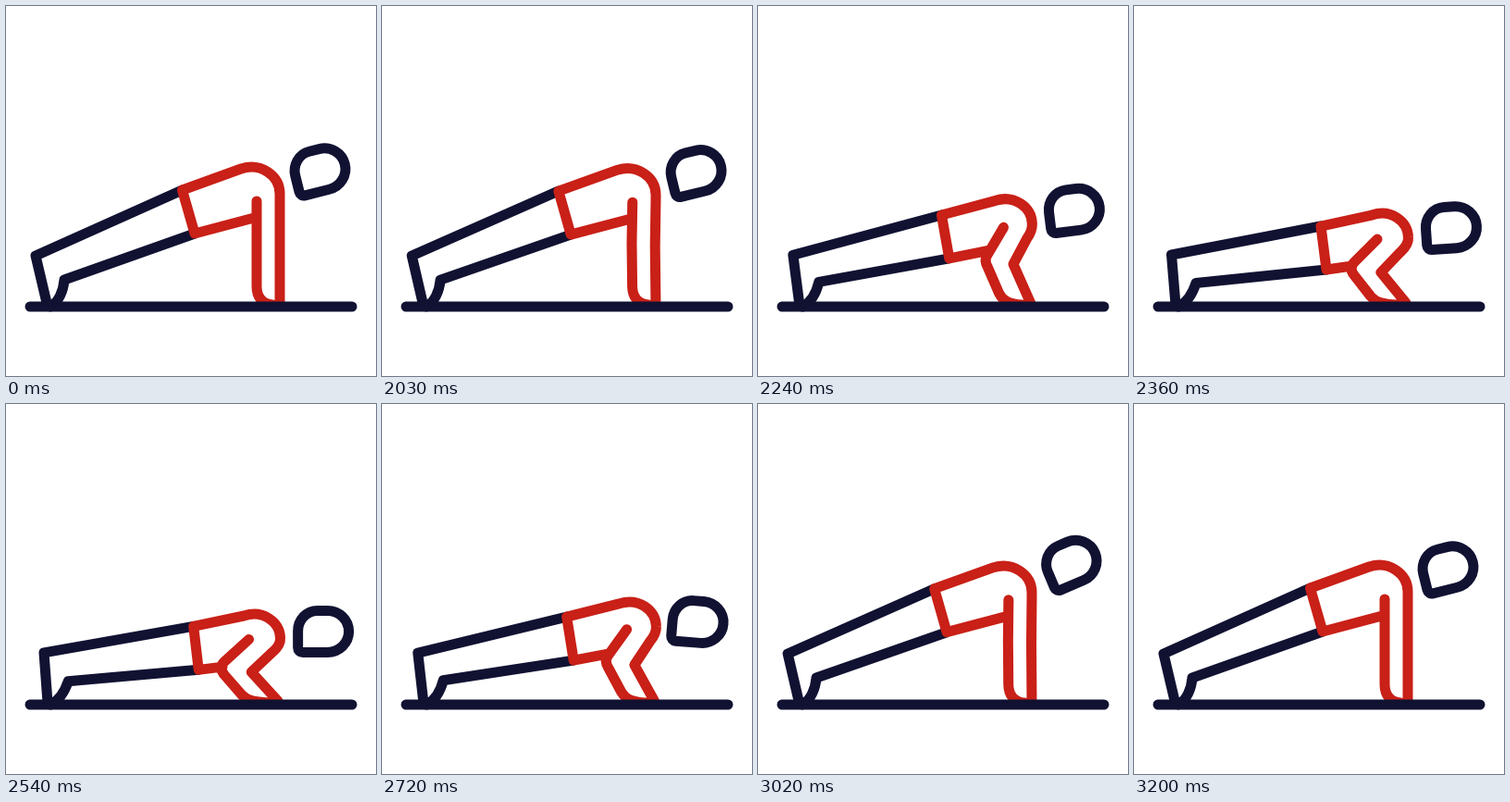
Recreate the animation shown at these times as an HTML page. Size 400x400 px, loop 3230 ms.

```html
<!DOCTYPE html>
<html lang="en">
<head>
<meta charset="utf-8">
<title>Push-up</title>
<style>
html, body { margin: 0; width: 100%; height: 100%; overflow: hidden; background: #fff; }
svg { display: block; width: 100%; height: 100%; }
path { fill: none; stroke-width: 11; stroke-linecap: round; stroke-linejoin: round; }
.navy { stroke: #111232; }
.red { stroke: #c92017; }
</style>
</head>
<body>
<svg viewBox="0 0 400 400">
  <path id="legs" class="navy"/>
  <path id="head" class="navy" d="M-27.5 -1A21 22 0 0 1 -6.5 -23H4.5A23 22.5 0 0 1 4.5 22H-22.5A5 5 0 0 1 -27.5 17Z"/>
  <path id="shirt" class="red"/>
  <path class="navy" d="M26 325H374"/>
</svg>
<script>
const LOOP = 3230;
const [legs, head, shirt] = ['legs', 'head', 'shirt'].map(id => document.getElementById(id));

// [time, value]: how far the body is lowered, and the extra nod of the head in degrees
const LOWER = [[2000, 0], [2150, .375], [2360, 1], [2540, 1.06], [2720, .8], [2870, .11], [2960, .03], [3200, 0]];
const NOD = [[2460, 0], [2690, 11.5], [2870, -2.5], [2985, -10], [3200, 0]];

// Smooth curve through the keys without overshoot
function curve(keys, t) {
  const n = keys.length - 1;
  if (t <= keys[0][0]) return keys[0][1];
  if (t >= keys[n][0]) return keys[n][1];
  const rate = i => (keys[i + 1][1] - keys[i][1]) / (keys[i + 1][0] - keys[i][0]);
  const slope = i => {
    if (i === 0 || i === n) return 0;
    const a = rate(i - 1), b = rate(i);
    return a * b > 0 ? 2 * a * b / (a + b) : 0;
  };
  let i = 0;
  while (t >= keys[i + 1][0]) i++;
  const [t0, v0] = keys[i], [t1, v1] = keys[i + 1];
  const d = t1 - t0, u = (t - t0) / d, w = 1 - u;
  return v0 * w * w * (1 + 2 * u) + v1 * u * u * (3 - 2 * u)
    + d * u * w * (w * slope(i) - u * slope(i + 1));
}

function draw(t) {
  const p = curve(LOWER, t), nod = curve(NOD, t);
  const mix = (a, b) => a + (b - a) * p;
  // A point between the raised and the lowered pose
  const pt = (x0, y0, x1, y1) => mix(x0, x1).toFixed(2) + ' ' + mix(y0, y1).toFixed(2) + ' ';
  const hip = pt(190.5, 199, 202, 238), waist = pt(204, 246, 208, 285);

  legs.setAttribute('d',
    'M' + hip + 'L' + pt(32, 270, 40.5, 269) + 'L' + pt(44.5, 323, 45, 323) +
    'M' + waist + 'L' + pt(63, 296, 67, 299.5) +
    'C' + pt(62, 308, 64, 309) + pt(57, 320, 58, 320) + '48 325');

  shirt.setAttribute('d',
    'M' + pt(270, 228.5, 236, 281) + 'L' + waist + 'L' + hip + 'L' + pt(254, 176, 257, 226) +
    'C' + pt(275, 169, 278, 219) + pt(296, 183, 296, 233) + pt(296, 203, 296.5, 250) +
    'Q' + pt(296, 210, 297, 258) + pt(296, 220, 288, 266) +
    'L' + pt(296, 259, 267, 288) + 'L' + pt(296, 321, 294, 321) +
    'M' + pt(271, 211, 263, 252) + 'L' + pt(271, 250, 238, 277) +
    'Q' + pt(271, 256, 232, 283) + pt(271, 262, 238, 291) +
    'L' + pt(271, 303, 256, 314) +
    'C' + pt(271, 315, 262, 321) + pt(277, 322, 270, 322) + pt(288, 323, 284, 323));

  const y = mix(178, 240);
  head.setAttribute('transform',
    `rotate(${nod} 296 ${y}) translate(${mix(339.7, 343)} ${y}) rotate(${mix(-14, -4)})`);
}

const start = performance.now();
function tick() {
  draw((performance.now() - start) % LOOP);
  requestAnimationFrame(tick);
}
tick();
</script>
</body>
</html>
```
